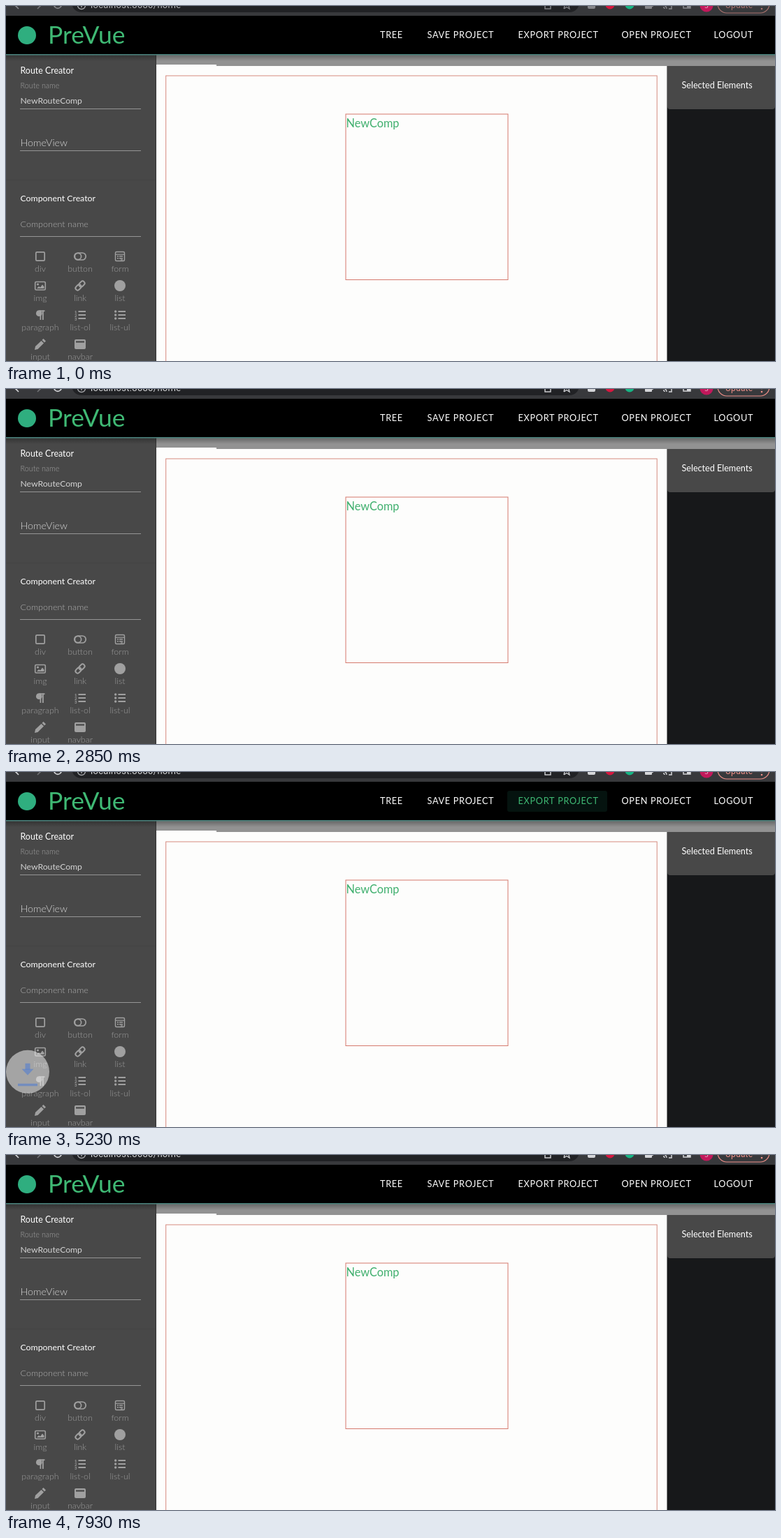
An HTML page with a canvas for the animation above (8 s loop, 1100 by 509 pixels).

```html
<!DOCTYPE html>
<html lang="en">
<head>
<meta charset="utf-8">
<title>PreVue</title>
<style>
html, body { margin: 0; width: 100%; height: 100%; overflow: hidden; background: #000; }
canvas { display: block; width: 1100px; height: 509px; }
</style>
</head>
<body>
<canvas id="stage" width="1100" height="509"></canvas>
<script>
const ctx = document.getElementById('stage').getContext('2d');
const LOOP = 8000;
const SANS = 'Lato, "Open Sans", sans-serif';
const GREEN = '#3fb974', ICON = '#a0a0a0', PANEL = '#484848';

function rect(x, y, w, h, color) {
  ctx.fillStyle = color;
  ctx.fillRect(x, y, w, h);
}

function box(x, y, w, h, color, line = 1) {
  ctx.strokeStyle = color;
  ctx.lineWidth = line;
  ctx.strokeRect(x, y, w, h);
}

function round(x, y, w, h, r, color, line) {
  ctx.beginPath();
  ctx.roundRect(x, y, w, h, r);
  paint(color, line);
}

function disc(x, y, r, color, line) {
  ctx.beginPath();
  ctx.arc(x, y, r, 0, Math.PI * 2);
  paint(color, line);
}

function poly(points, color, line) {
  ctx.beginPath();
  points.forEach(([x, y]) => ctx.lineTo(x, y));
  if (!line) ctx.closePath();
  paint(color, line);
}

function paint(color, line) {
  if (line) {
    ctx.strokeStyle = color;
    ctx.lineWidth = line;
    ctx.stroke();
  } else {
    ctx.fillStyle = color;
    ctx.fill();
  }
}

function text(str, x, y, size, color, { weight = 400, align = 'left', gap = 0, font = SANS } = {}) {
  ctx.font = `${weight} ${size}px ${font}`;
  ctx.letterSpacing = gap + 'px';
  ctx.textAlign = align;
  ctx.fillStyle = color;
  ctx.fillText(str, x, y);
}

function browserBar(active) {
  const glyph = active ? '#d4d5d8' : '#85868a';
  const pink = active ? '#ee8f88' : '#a8716d';
  rect(0, 0, 1100, 14, '#38393c');
  round(94, -19, 726, 28, 14, '#212225');

  poly([[18, -6], [13, -1], [18, 4]], glyph, 1.7);
  poly([[13, -1], [22, -1]], glyph, 1.7);
  poly([[45, -6], [50, -1], [45, 4]], '#707174', 1.7);
  ctx.beginPath();
  ctx.arc(74, -2, 5.3, 0, Math.PI);
  paint(glyph, 1.7);
  disc(108, -1, 5.5, '#a5a6a9', 1.4);
  rect(107.3, -2, 1.5, 4, '#a5a6a9');
  text('localhost:8080/home', 121, 3, 13, active ? '#d7d8da' : '#b5b6b9',
    { font: 'Roboto, sans-serif', gap: 0.3 });

  box(771, -5, 8, 9, glyph, 1.4);
  poly([[798, 4], [799, 0], [796, -3], [802, -8], [808, -3], [805, 0], [806, 4], [802, 1.5], [798, 4]], glyph, 1.3);
  round(832, -7, 11, 11, 2, glyph);
  disc(864, -2, 6.5, '#d7173f');
  disc(892, -2, 6.5, '#16b584');
  round(914, -5, 10, 9, 1, glyph);
  disc(924, -1, 2.3, glyph);
  poly([[942, -5], [952, -5], [952, 4], [948, 4]], glyph, 1.5);
  for (const r of [2, 5]) {
    ctx.beginPath();
    ctx.arc(940, 4, r, -Math.PI / 2, 0);
    paint(glyph, 1.4);
  }
  box(969, -6, 10, 9, glyph, 1.5);
  rect(974, -6, 5, 9, glyph);
  disc(1002, -1, 9.5, '#c2185b');
  text('S', 1002, 3, 10, '#e7b4c8', { align: 'center' });
  round(1018, -16, 74, 26, 13, pink, 1.2);
  text('Update', 1029, 3, 12, pink, { font: 'Roboto, sans-serif', gap: 0.2 });
  for (const y of [-6, -1, 4]) disc(1081, y, 1.3, pink);
}

const menu = [['TREE', 535], ['SAVE PROJECT', 602.5], ['EXPORT PROJECT', 732.5],
  ['OPEN PROJECT', 880.5], ['LOGOUT', 1012.5]];

function header(hover, glow) {
  rect(0, 14, 1100, 56, '#000');
  disc(30, 42, 13, '#2fae7f');
  text('PreVue', 60, 54, 35.5, GREEN, { gap: 0.1 });
  if (hover) round(717, 27, 143, 30, 3, `rgba(40, 150, 120, ${glow})`);
  menu.forEach(([label, x], i) =>
    text(label, x, 46.2, 12.7, hover && i === 2 ? GREEN : '#fff', { gap: 0.7 }));

  const shade = ctx.createLinearGradient(0, 70, 0, 79);
  shade.addColorStop(0, 'rgba(0, 0, 0, 0.3)');
  shade.addColorStop(1, 'rgba(0, 0, 0, 0)');
  rect(0, 70, 1100, 9, shade);
  rect(0, 69, 1100, 1.5, '#4c8580');
}

const icons = {
  div: (x, y) => round(x - 6.2, y - 6.2, 12.4, 12.4, 1.5, ICON, 1.7),
  button(x, y) {
    round(x - 8.2, y - 5, 16.4, 10, 5, ICON, 1.7);
    disc(x - 3, y, 4.6, ICON, 1.7);
  },
  form(x, y) {
    round(x - 6.5, y - 6.5, 13, 13, 1.5, ICON, 1.4);
    rect(x - 6, y - 3.4, 12, 1.2, ICON);
    for (const dy of [-1, 2]) {
      rect(x - 4, y + dy, 2, 1.5, ICON);
      rect(x - 1, y + dy, 5, 1.5, ICON);
    }
    rect(x + 1, y + 4.3, 3, 1.2, ICON);
  },
  img(x, y) {
    round(x - 7.3, y - 5.5, 14.6, 11.5, 1.5, ICON, 1.6);
    disc(x - 3.5, y - 2, 1.6, ICON);
    poly([[x - 5, y + 4], [x - 2, y + 1], [x, y + 2.5], [x + 3, y - 1.5], [x + 5.5, y + 1.5], [x + 5.5, y + 4]], ICON);
  },
  link(x, y) {
    ctx.save();
    ctx.translate(x, y);
    ctx.rotate(-Math.PI / 4);
    round(-8, -3, 9, 6, 3, ICON, 2);
    round(-1, -3, 9, 6, 3, ICON, 2);
    ctx.restore();
  },
  list: (x, y) => disc(x, y, 8, ICON),
  paragraph(x, y) {
    disc(x - 1.7, y - 2.3, 4.4, ICON);
    rect(x - 1.5, y - 6.7, 8, 1.8, ICON);
    rect(x - 0.5, y - 6.5, 1.8, 13.5, ICON);
    rect(x + 3, y - 6.5, 1.8, 13.5, ICON);
  },
  'list-ol'(x, y) {
    bars(x, y);
    ['1', '2', '3'].forEach((n, i) => text(n, x - 8, y - 2.5 + i * 5, 6, ICON, { weight: 700 }));
  },
  'list-ul'(x, y) {
    bars(x, y);
    for (const dy of [-5, 0, 5]) disc(x - 6.3, y + dy, 1.7, ICON);
  },
  input(x, y) {
    poly([[x - 8, y + 8], [x - 7, y + 3], [x + 1.5, y - 5], [x + 5, y - 1.5], [x - 3.5, y + 7]], ICON);
    poly([[x + 2.5, y - 6], [x + 4.5, y - 8], [x + 8, y - 4.5], [x + 6, y - 2.5]], ICON);
  },
  navbar(x, y) {
    round(x - 8, y - 7, 16, 14, 2, ICON);
    rect(x - 6, y - 4.6, 12, 2.2, PANEL);
  }
};

function bars(x, y) {
  for (const dy of [-5, 0, 5]) rect(x - 2.5, y + dy - 1, 10.5, 2, ICON);
}

function sidebar() {
  const light = { weight: 300 };
  rect(0, 70, 215, 439, PANEL);
  rect(0, 249, 215, 1, '#434343');
  rect(214, 70, 1, 439, '#343434');
  text('Route Creator', 20.5, 97, 12.4, '#fff');
  text('Route name', 20.5, 118, 10.8, '#a0a0a0', light);
  text('NewRouteComp', 20.5, 140, 12.2, '#d4d4d4');
  rect(20, 147, 173, 1, '#959595');
  text('HomeView', 20.5, 200.5, 14.3, '#d6d6d6', light);
  rect(20, 207, 173, 1, '#959595');
  text('Component Creator', 20.5, 280, 12.3, '#fff');
  text('Component name', 20.5, 317, 12.6, '#b0b0b0', light);
  rect(20, 330, 173, 1, '#959595');
  Object.keys(icons).forEach((name, i) => {
    const x = 49 + i % 3 * 57, y = 359 + Math.floor(i / 3) * 42;
    icons[name](x, y);
    text(name, x, y + 22, 12.4, '#9c9c9c', { weight: 300, align: 'center' });
  });
}

function workspace() {
  rect(215, 70, 885, 16, '#929292');
  rect(215, 84, 86, 2, '#fff');
  rect(945, 86, 155, 423, '#17181a');
  rect(215, 86, 730.5, 423, '#fdfdfc');
  box(228.7, 100, 702.5, 440, '#d5897e');
  box(486, 155, 232, 237.5, '#d5796d');
  text('NewComp', 486.5, 173.5, 16.3, '#41b06f');
  round(946, 86, 154, 62, [0, 0, 4, 4], PANEL);
  text('Selected Elements', 966.5, 118, 12.6, '#fff');
}

// The badge sinks by its own height while fading in and out.
function download(v) {
  if (v <= 0 || v >= 1) return;
  const y = 419 + 65 * v, blue = '#4c7bd3';
  ctx.globalAlpha = 1 - 4 * (v - 0.5) ** 2;
  disc(31, y, 31, '#eee');
  rect(27.5, y - 12, 7, 9, blue);
  poly([[22.5, y - 4], [39.5, y - 4], [31, y + 5]], blue);
  rect(17, y + 17, 28, 3.5, blue);
  ctx.globalAlpha = 1;
}

function draw(t) {
  const hover = t >= 2900 && t < 6650;
  const pressed = t >= 4300 && t < 5900;
  ctx.clearRect(0, 0, 1100, 509);
  sidebar();
  workspace();
  browserBar(t >= 500);
  header(hover, pressed ? 0.13 : 0.06);
  download((t - 4973) / 1555);
}

const start = performance.now();
function frame() {
  draw((performance.now() - start) % LOOP);
  requestAnimationFrame(frame);
}
frame();
</script>
</body>
</html>
```
